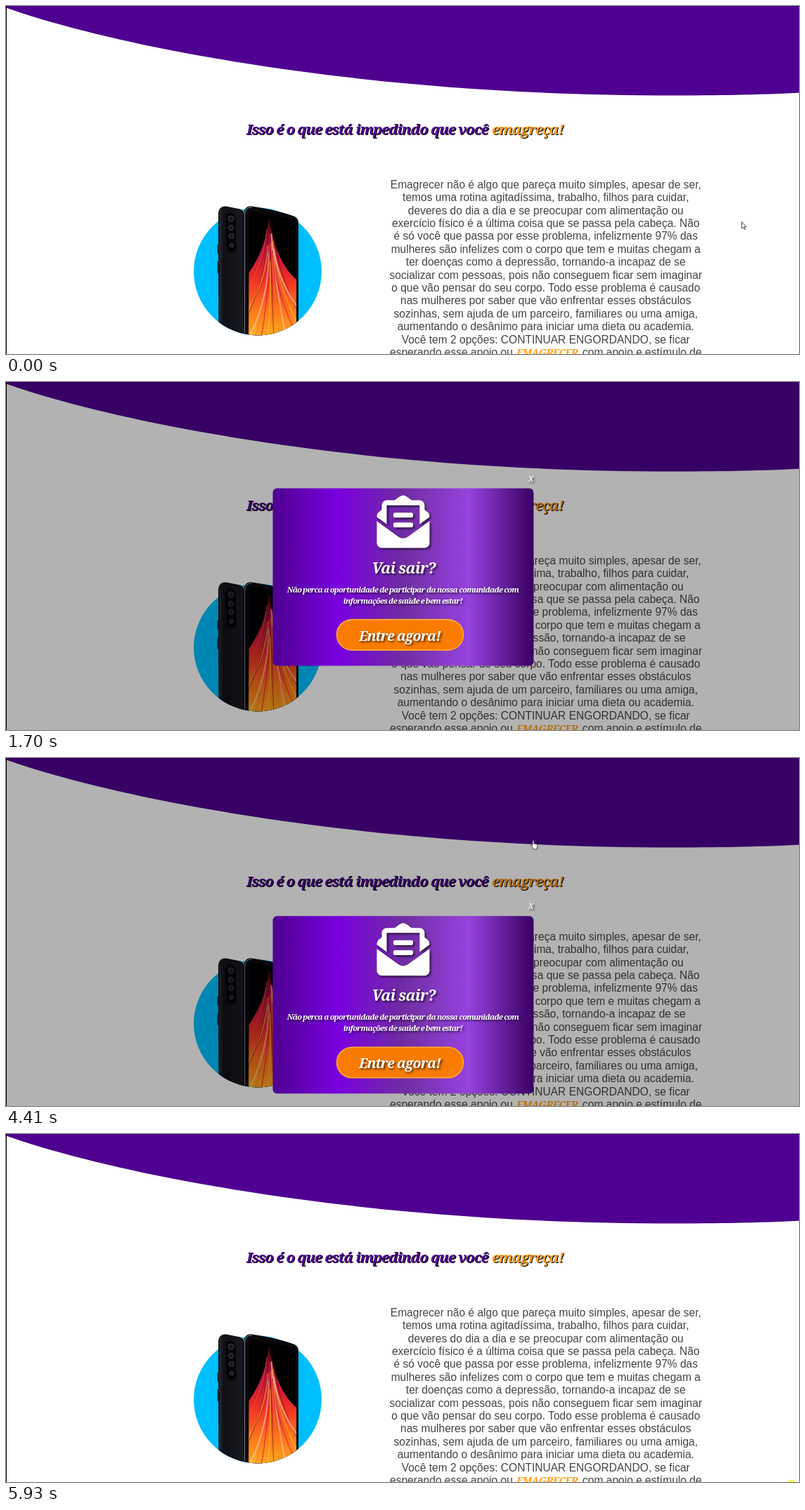
Recreate the animation shown at these times as an HTML page. Size 1128 by 496 pixels, loop 6020 ms.

```html
<!DOCTYPE html>
<html lang="pt">
<head>
<meta charset="utf-8">
<title>Pop-up de saída</title>
<style>
  html, body { margin: 0; width: 100%; height: 100%; overflow: hidden; background: #fff; }
  svg { display: block; }
  .serif { font-family: "Noto Serif", serif; font-style: italic; font-weight: 700; letter-spacing: -.05em; }
  .body { font: 15.57px "Liberation Sans", Arial, sans-serif; fill: #444; }
  .title { font-size: 20.5px; filter: drop-shadow(1.2px 1.2px .6px #000); }
  .card { fill: #fff; filter: drop-shadow(2px 2px 1.5px rgba(0,0,0,.65)); }
  .mid { text-anchor: middle; }
</style>
</head>
<body>
<svg id="stage" width="1128" height="496" viewBox="0 0 1128 496">
  <defs>
    <linearGradient id="cardFill">
      <stop offset="0" stop-color="#4f0092"/>
      <stop offset=".25" stop-color="#7a00df"/>
      <stop offset=".5" stop-color="#702da2"/>
      <stop offset=".75" stop-color="#9642de"/>
      <stop offset="1" stop-color="#390062"/>
    </linearGradient>
    <linearGradient id="flame" x2="0" y2="1">
      <stop offset="0" stop-color="#4a0614"/>
      <stop offset=".28" stop-color="#b8123a"/>
      <stop offset=".52" stop-color="#ee3026"/>
      <stop offset=".76" stop-color="#ff741a"/>
      <stop offset="1" stop-color="#ffae1e"/>
    </linearGradient>
    <linearGradient id="back">
      <stop offset="0" stop-color="#2b2c33"/>
      <stop offset=".2" stop-color="#101116"/>
      <stop offset="1" stop-color="#191a21"/>
    </linearGradient>
    <clipPath id="photo"><path d="M267 270H449V378.5A91 91 0 0 1 267 378.5Z"/></clipPath>
    <clipPath id="screen"><path d="M346 300Q347 292 353 293L408 304Q413 305 413 311V470H345Z"/></clipPath>
  </defs>

  <rect width="1128" height="496" fill="#fff"/>
  <path fill="#4f0090" transform="translate(-80 -52.2) scale(1.694 1.81)"
    d="M0 0V6.7C0 24.7 240.2 100.3 615.2 99.3C989.8 98.5 1000 25 1000 6.7V0Z"/>

  <text class="serif title" x="342" y="183" fill="#4f0090">Isso é o que está impedindo que você</text>
  <text class="serif title" x="691" y="183" fill="#ff9f1e">emagreça!</text>

  <circle cx="358" cy="378.5" r="91" fill="#00bfff"/>
  <g clip-path="url(#photo)">
    <path d="M302.5 296Q303 285 313 286L333 290Q338 291 338 299V470H303Z" fill="url(#back)" stroke="#050507"/>
    <path d="M301.5 340V353M301.5 364V381" stroke="#222" stroke-width="1.6"/>
    <rect x="313" y="295" width="14" height="56" rx="6" fill="#050507" transform="rotate(-2 320 323)"/>
    <g fill="#15161c" stroke="#4d5059" stroke-width=".8">
      <circle cx="320" cy="303" r="4"/><circle cx="320" cy="316" r="3.6"/>
      <circle cx="320.5" cy="328" r="3.6"/><circle cx="321" cy="341" r="2.6"/>
    </g>
    <path d="M338 297Q339 284 350 285.5Q382 290 408 299Q416 301 416 310V470H338Z" fill="#09090c"/>
    <path d="M339.5 470V298Q340 286 350 287" fill="none" stroke="#72747c" stroke-width="1.2"/>
    <g clip-path="url(#screen)">
      <rect x="340" y="286" width="78" height="190" fill="#020102"/>
      <path d="M340 388C358 364 370 338 374 302C380 346 398 380 416 392V472H340Z" fill="url(#flame)"/>
      <g id="streaks" fill="none" stroke-linecap="round"></g>
    </g>
  </g>

  <g id="copy" class="body mid"></g>
  <g class="body">
    <text x="546" y="499.2">esperando esse apoio ou</text>
    <text class="serif" x="726" y="499.2" style="font-size:14.5px" fill="#ff9f1e">EMAGRECER</text>
    <text x="820" y="499.2">com apoio e estímulo de</text>
  </g>

  <g id="popup">
    <rect y="-188" width="1128" height="892" fill="#000" opacity=".3"/>
    <rect x="379.5" y="132" width="371" height="253" rx="6" fill="url(#cardFill)"/>
    <g class="card">
      <g transform="translate(527.5 142) scale(.1465)">
        <path d="M0 251L209 402Q256 433 303 402L512 251V464a48 48 0 0 1-48 48H48a48 48 0 0 1-48-48Z"/>
        <path d="M0 211V201Q0 178 18 163L48 140V96a48 48 0 0 1 48-48H174L183 41C200 29 233 0 256 0S312 29 329 41L338 48H416a48 48 0 0 1 48 48V140L494 163Q512 178 512 201V211L416 281V96H96V281Z"/>
        <rect x="160" y="168" width="192" height="48" rx="16"/>
        <rect x="160" y="264" width="192" height="48" rx="16"/>
      </g>
    </g>
    <g class="serif mid card">
      <text x="565.5" y="253" font-size="21.5">Vai sair?</text>
      <g font-size="11.05">
        <text x="564.5" y="280">Não perca a oportunidade de participar da nossa comunidade com</text>
        <text x="564.5" y="296">informações de saúde e bem estar!</text>
      </g>
    </g>
    <rect x="470.5" y="319" width="180" height="43.5" rx="21.7" fill="#f97b00" stroke="#ffac2e" stroke-width="1.6"/>
    <text class="serif mid card" x="560" y="349" font-size="19.7">Entre agora!</text>
    <text class="serif mid card" x="746.5" y="122" font-size="15" style="font-weight:400">x</text>
  </g>

  <path id="arrow" d="M.5 .5V10.2L2.7 8.2L4.3 11.6L5.6 11L4.1 7.6H7Z" fill="#fff" stroke="#222" stroke-width=".8"/>
  <path id="hand" d="M3 1.2Q4 -.2 5 1.2V5L9 6Q10.2 6.4 10 8L9.3 11V13H4L3.5 11L.7 8.2Q.5 6.8 1.8 7L3 8Z"
    fill="#fff" stroke="#222" stroke-width=".8"/>
  <circle id="glow" cx="1117" cy="500.5" r="7.5" fill="#f8f84a"/>
  <rect width="1" height="496" fill="#000"/>
</svg>
<script>
const LOOP = 6020;
const $ = id => document.getElementById(id);

function add(parent, tag, attrs, text = '') {
  const el = document.createElementNS('http://www.w3.org/2000/svg', tag);
  for (const key in attrs) el.setAttribute(key, attrs[key]);
  el.textContent = text;
  parent.appendChild(el);
}

[
  'Emagrecer não é algo que pareça muito simples, apesar de ser,',
  'temos uma rotina agitadíssima, trabalho, filhos para cuidar,',
  'deveres do dia a dia e se preocupar com alimentação ou',
  'exercício físico é a última coisa que se passa pela cabeça. Não',
  'é só você que passa por esse problema, infelizmente 97% das',
  'mulheres são infelizes com o corpo que tem e muitas chegam a',
  'ter doenças como a depressão, tornando-a incapaz de se',
  'socializar com pessoas, pois não conseguem ficar sem imaginar',
  'o que vão pensar do seu corpo. Todo esse problema é causado',
  'nas mulheres por saber que vão enfrentar esses obstáculos',
  'sozinhas, sem ajuda de um parceiro, familiares ou uma amiga,',
  'aumentando o desânimo para iniciar uma dieta ou academia.',
  'Você tem 2 opções: CONTINUAR ENGORDANDO, se ficar'
].forEach((line, i) => add($('copy'), 'text', { x: 767.8, y: 259.7 + i * 18.42 }, line));

// Light trails fan out from the top of the screen.
const hues = ['#ff5a4c', '#d3163f', '#ffb52e', '#5e0818', '#ff7d1a', '#ffd0a8'];
for (let i = 0; i < 18; i++) {
  const foot = 300 + i * 9;
  const top = 318 + (i * 37 % 50);
  add($('streaks'), 'path', {
    d: `M${371 + i * .6} ${top}Q${367 + i * 1.3} ${top + 65} ${foot} 474`,
    stroke: hues[i % hues.length], 'stroke-width': 1 + i % 3 * .6, opacity: .6
  });
}

const lerp = (a, b, u) => a + (b - a) * u;
const curve = (a, b, c, u) => a.map((v, i) =>
  lerp(lerp(v, b[i], u), lerp(b[i], c[i], u), u));

// Progress in n equal jumps; the first lands on start, the last on end.
function steps(t, start, end, n) {
  const k = Math.floor((t - start) / (end - start) * (n - 1) + 1e-6) + 1;
  return Math.min(n, Math.max(0, k)) / n;
}

const held = (t, ticks) => ticks.filter(k => k <= t).pop();
const opening = [1260, 1320, 1430, 1520, 1610, 1700, 1770, 1840];
const closing = [4410, 4510, 4580, 4640];

function popupOffset(t) {
  if (t < 1260 || t >= 4640) return null;
  if (t < 4410) return 312 * ((1840 - held(t, opening)) / 520) ** 2.11;
  const u = (held(t, closing) - 4368) / 500;
  return 888 * (1 - (1 - u ** 1.4) ** 3.5);
}

function pointer(t) {
  if (t < 1020) return ['arrow', curve([1046, 307], [860, 262], [697, 239], steps(t, 90, 620, 9))];
  if (t < 1260) return ['arrow', curve([697, 239], [745, 220], [793, 185], steps(t, 1020, 1110, 2))];
  if (t < 2440) return null;
  if (t < 3050) return ['arrow', curve([1033, 108], [850, 205], [711, 148], steps(t, 2440, 2980, 8) * 8 / 7 - 1 / 7)];
  if (t < 3260) return ['arrow', curve([711, 148], [730, 130], [748, 107], steps(t, 3050, 3260, 4))];
  if (t < 4890) return ['hand', curve([748, 107], [748, 112], [746, 117], steps(t, 3600, 3740, 3))];
  if (t < 5320) return ['arrow', curve([749, 117], [900, 240], [1129, 437], steps(t, 4890, 5320, 7))];
  return null;
}

function show(id, pos) {
  $(id).style.display = pos ? '' : 'none';
  if (pos) $(id).setAttribute('transform', `translate(${pos[0]} ${pos[1]})`);
}

function draw(t) {
  const offset = popupOffset(t);
  show('popup', offset === null ? null : [0, offset]);
  const [kind, pos] = pointer(t) || [];
  for (const id of ['arrow', 'hand']) show(id, id === kind ? pos : null);
  $('glow').style.display = t >= 5930 ? '' : 'none';
}

const began = performance.now();
function tick() {
  draw((performance.now() - began) % LOOP);
  requestAnimationFrame(tick);
}
tick();
</script>
</body>
</html>
```
